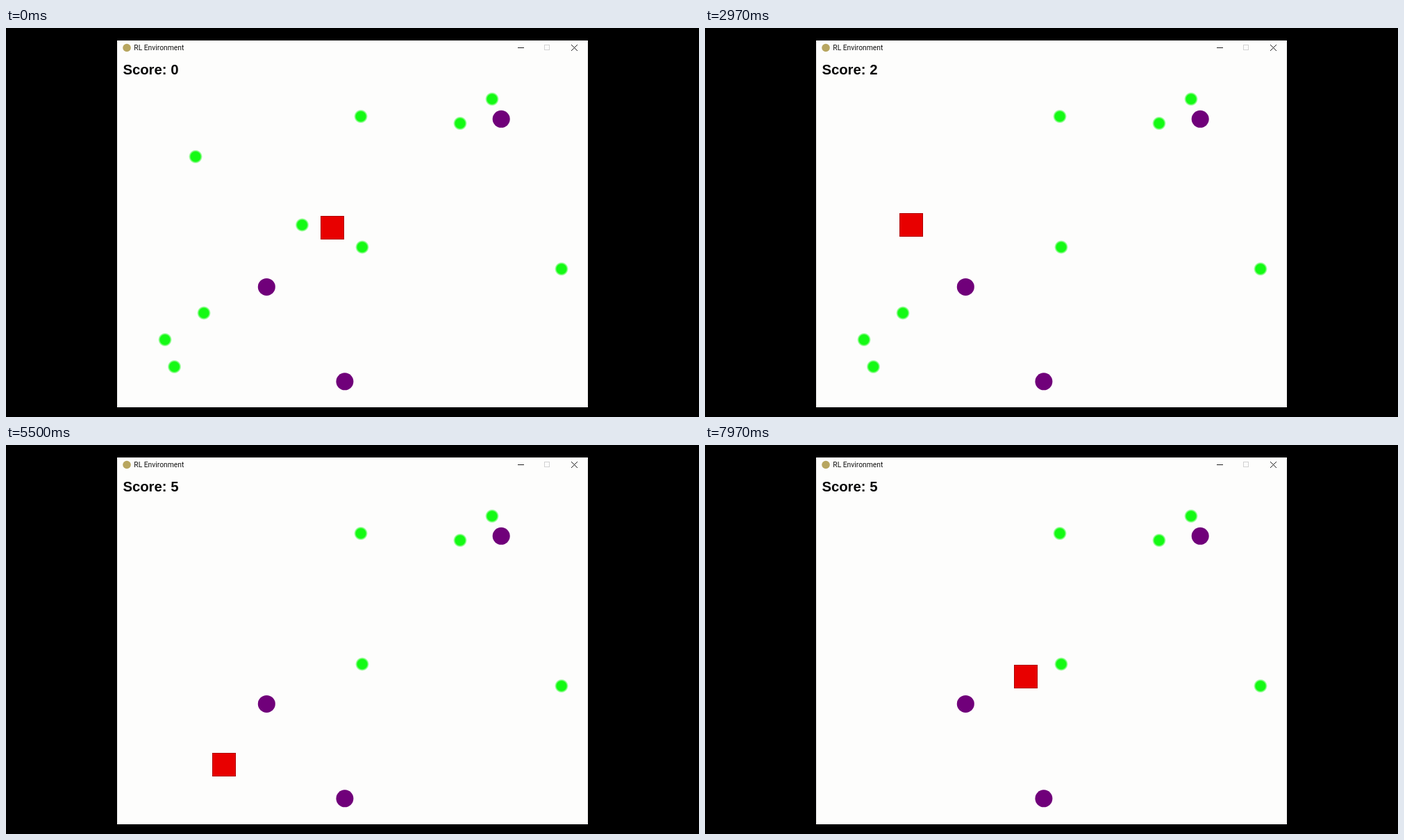
These frames come from a looping animation (998 px wide and 561 px high, 8 s). An HTML page with a canvas:

```html
<!DOCTYPE html>
<html lang="en">
<head>
<meta charset="utf-8">
<title>RL Environment</title>
<style>
html, body { margin: 0; width: 100%; height: 100%; overflow: hidden; background: #000; }
canvas { display: block; }
</style>
</head>
<body>
<canvas id="stage" width="998" height="561"></canvas>
<script>
const ctx = document.getElementById('stage').getContext('2d');
const LOOP = 8000;
const STEP = 4.235;   // the player moves on a grid
const SIZE = 34;
const REACH = 10.2;   // distance at which food is eaten
const START = { x: 470.4, y: 287.8 };

// Corners of the player's route: ms, columns and rows from the start
const ROUTE = [
  [0, 0, 0], [300, -8, 0], [896, -8, -16], [2144, -41, -16], [2262, -41, -19],
  [4100, -41, 29], [4489, -51, 29], [4956, -51, 41], [5868, -27, 41],
  [6199, -27, 32], [7036, -5, 32], [7853, -5, 11], [LOOP, -1, 11]
];

const point = ([x, y]) => ({ x, y });
const HAZARDS = [[713.2, 131.3], [375.3, 373.4], [487.9, 509.8]].map(point);
const FOOD = [
  [426.5, 284], [273, 185.5], [285, 411], [229, 449.5], [242.5, 488.5],
  [511, 127.5], [654, 137.5], [700, 102.5], [513, 316], [800, 347.5]
].map(point);

function playerAt(t) {
  const i = ROUTE.findIndex(corner => corner[0] > t);
  const [t0, col0, row0] = ROUTE[i - 1];
  const [t1, col1, row1] = ROUTE[i];
  const k = (t - t0) / (t1 - t0);
  return {
    x: START.x + STEP * Math.round(col0 + (col1 - col0) * k),
    y: START.y + STEP * Math.round(row0 + (row1 - row0) * k)
  };
}

function touches(player, food) {
  const gap = Math.max(Math.abs(player.x - food.x), Math.abs(player.y - food.y));
  return gap < SIZE / 2 + REACH;
}

// Walk the route once to find when each piece of food is eaten
for (const food of FOOD) {
  let t = 0;
  while (t < LOOP && !touches(playerAt(t), food)) t += 10;
  food.eatenAt = t;
}

function disc({ x, y }, r, fill) {
  ctx.fillStyle = fill;
  ctx.beginPath();
  ctx.arc(x, y, r, 0, Math.PI * 2);
  ctx.fill();
}

function label(text, x, y, font, color) {
  ctx.font = font;
  ctx.fillStyle = color;
  ctx.fillText(text, x, y);
}

function line(x0, y0, x1, y1) {
  ctx.beginPath();
  ctx.moveTo(x0, y0);
  ctx.lineTo(x1, y1);
  ctx.stroke();
}

function drawWindow() {
  ctx.fillStyle = '#000';
  ctx.fillRect(0, 0, 998, 561);
  ctx.fillStyle = '#fdfdfc';
  ctx.fillRect(160, 18, 678, 529);
  disc({ x: 174, y: 28.5 }, 5.8, '#b8a660');
  label('RL Environment', 184.3, 32.4, '10.3px Roboto, sans-serif', '#111');
  ctx.lineWidth = 1;
  ctx.strokeStyle = '#222';
  line(737, 28.5, 746, 28.5);
  line(814, 24, 823, 33);
  line(823, 24, 814, 33);
  ctx.strokeStyle = '#d2d2d2';
  ctx.strokeRect(775.5, 24.5, 7, 7);
}

function drawFood(food) {
  const { x, y } = food;
  const glow = ctx.createRadialGradient(x, y, 6.8, x, y, 10);
  glow.addColorStop(0, 'rgb(20, 250, 20)');
  glow.addColorStop(1, 'rgba(20, 250, 20, 0)');
  disc(food, 10, glow);
}

function drawPlayer({ x, y }) {
  const left = Math.round(x - SIZE / 2), top = Math.round(y - SIZE / 2);
  ctx.fillStyle = '#e80000';
  ctx.fillRect(left, top, SIZE, SIZE);
  ctx.strokeStyle = '#b00000';
  ctx.strokeRect(left + 0.5, top + 0.5, SIZE - 1, SIZE - 1);
}

function draw(t) {
  const left = FOOD.filter(food => food.eatenAt > t);
  drawWindow();
  left.forEach(drawFood);
  for (const hazard of HAZARDS) disc(hazard, 12.5, '#70007a');
  drawPlayer(playerAt(t));
  label('Score: ' + (FOOD.length - left.length), 168.4, 67.2,
    'bold 20.3px "Liberation Sans", Arial, sans-serif', '#080808');
}

let begin;
function tick(now) {
  begin ??= now;
  draw((now - begin) % LOOP);
  requestAnimationFrame(tick);
}
draw(0);
requestAnimationFrame(tick);
</script>
</body>
</html>
```
